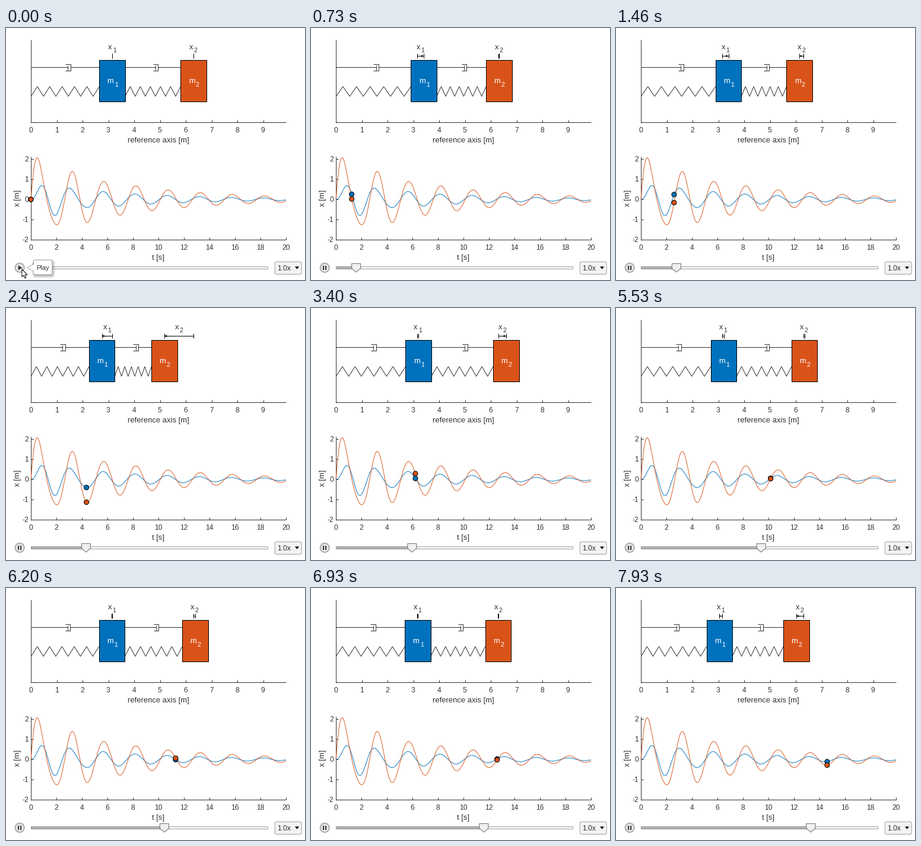
These frames come from a looping animation (504 px wide and 425 px high, 8000 ms). A matplotlib script:

```python
import numpy as np
import matplotlib.pyplot as plt
from matplotlib.animation import FuncAnimation
from matplotlib.patches import Circle, FancyBboxPatch, Polygon, Rectangle

W, H, DPI = 504, 425, 100
LOOP_MS, INTERVAL = 8000, 40
FRAMES = LOOP_MS // INTERVAL
STEPS = 120                      # screen updates per loop

BLUE, ORANGE, INK, GREY = "#0072BD", "#D95319", "#333333", "#8c8c8c"
PT = 72 / DPI                    # points per pixel
NUDGE = 0.2                      # keeps half-pixel lines on their own pixel when snapped

plt.rcParams["font.family"] = "Liberation Sans"
fig = plt.figure(figsize=(W / DPI, H / DPI), dpi=DPI, facecolor="white")
ax = fig.add_axes([0, 0, 1, 1])
ax.set(xlim=(NUDGE, W + NUDGE), ylim=(H + NUDGE, NUDGE))
ax.axis("off")


# ---------- drawing helpers (pixel coordinates, y down) ----------
def line(x=(), y=(), color=INK, width=1.0, z=2, alpha=1):
    return ax.plot(x, y, color=color, lw=width * PT, zorder=z, alpha=alpha,
                   solid_capstyle="butt", solid_joinstyle="miter")[0]


def label(x, y, text, size=12, color=INK, ha="center", va="center_baseline", **kw):
    return ax.text(x, y, text, fontsize=size * PT, color=color, ha=ha, va=va, **kw)


def add(patch):
    return ax.add_patch(patch)


def shape(points, face, edge, z, width=1.0):
    return add(Polygon(points, fc=face, ec=edge, lw=width * PT, zorder=z))


def rounded(x, y, w, h, r, face, edge, z, alpha=1):
    return add(FancyBboxPatch((x, y), w, h, boxstyle=f"round,pad=0,rounding_size={r}",
                              fc=face, ec=edge, lw=PT, zorder=z, alpha=alpha))


# ---------- two masses in a row, the second one kicked ----------
K1, K2, C1, C2, RATIO, KICK = 10.05, 10.05, 0.1, 1.0, 0.25, 7.85
SYSTEM = np.array([
    [0, 0, 1, 0],
    [0, 0, 0, 1],
    [-K1 - RATIO * K2, RATIO * K2, -C1 - RATIO * C2, RATIO * C2],
    [K2, -K2, C2, -C2],
])
POLES, MODES = np.linalg.eig(SYSTEM)
WEIGHTS = np.linalg.solve(MODES, np.array([0, 0, 0, KICK], dtype=complex))


def response(t):
    """Displacements (x1, x2) at time t."""
    parts = WEIGHTS[:, None] * np.exp(np.outer(POLES, np.atleast_1d(t)))
    return (MODES @ parts).real[:2]


# ---------- upper axes ----------
X0, METRE = 42.5, 43.5
line([X0, X0], [20, 160])
line([X0, 472], [159.5, 159.5])
for k in range(10):
    x = X0 + k * METRE
    line([x, x], [155.5, 159.5])
    label(x - 0.5, 172, str(k))
label(257, 188.7, "reference axis [m]", 13)

# ---------- lower axes ----------
SEC, UNIT, ZERO = 21.5, 34.0, 289.3
line([X0, X0], [217.5, 358])
line([X0, 472], [357.5, 357.5])
for k in range(0, 21, 2):
    x = X0 + k * SEC
    line([x, x], [353.5, 357.5])
    label(x - 0.3, 369.6, str(k))
for k in range(-2, 3):
    y = ZERO - k * UNIT
    line([X0, X0 + 4], [y, y])
    label(38, y - 0.3, str(k), ha="right")
label(257, 386.5, "t [s]", 13)
label(20.5, 286.7, "x [m]", 13, va="center", rotation=90)

grid = np.linspace(0, 20, 900)
for x, color in zip(response(grid), (BLUE, ORANGE)):
    line(X0 - 0.3 + grid * SEC, ZERO - x * UNIT, color, 1.1, 3, 0.85)


# ---------- moving parts ----------
class Link:
    """Damper and spring between two x positions."""

    def __init__(self):
        self.rod, self.piston, self.cup, self.tail, self.spring = (
            line() for _ in range(5))

    def place(self, a, b):
        mid = (a + b) / 2
        self.rod.set_data([a, mid + 4.3], [66.5, 66.5])
        self.piston.set_data([mid + 4.3] * 2, [63, 71])
        self.cup.set_data([mid, mid + 8.7, mid + 8.7, mid], [61.5, 61.5, 72.5, 72.5])
        self.tail.set_data([mid + 8.7, b], [66.5, 66.5])
        self.spring.set_data(np.linspace(a, b, 12), [115.5, 99] * 6)


class Mass:
    """Block with its name, displacement arrow and dot on the graph."""

    def __init__(self, index, rest, color):
        self.rest = rest
        self.box = add(Rectangle((rest, 54.5), METRE, 70, fc=color, ec="black",
                                 lw=PT, zorder=4))
        self.name = label(0, 93, "m", 13, "white", "left", "baseline", zorder=5)
        self.name_sub = label(0, 99, str(index), 10.5, "white", "left", "baseline", zorder=5)
        self.tag = label(0, 35.7, "x", 13, ha="left", va="baseline")
        self.tag_sub = label(0, 41.4, str(index), 10.5, ha="left", va="baseline")
        ref = rest + METRE / 2
        line([ref, ref], [43.5, 51], "black")
        self.end, self.shaft = line(color="black"), line(color="black")
        self.head = shape([(0, 0)] * 3, "black", "none", 3)
        self.dot = add(Circle((0, 0), 4, fc=color, ec="black", lw=PT, zorder=6))

    def place(self, t, disp):
        left = self.rest + disp * METRE
        ref, tip = self.rest + METRE / 2, left + METRE / 2
        self.box.set_x(left)
        self.name.set_x(left + 13.3)
        self.name_sub.set_x(left + 25.5)
        mid = (ref + tip) / 2
        self.tag.set_x(mid - 6.8)
        self.tag_sub.set_x(mid + 0.7)
        self.end.set_data([tip, tip], [43.5, 51])
        self.shaft.set_data([ref, tip], [47.5, 47.5])
        size = min(4.0, abs(tip - ref) / 2)
        base = tip - np.sign(disp) * size
        self.head.set_xy([(tip, 47.5), (base, 47.5 - size / 2), (base, 47.5 + size / 2)])
        self.dot.center = (X0 - 0.3 + t * SEC, ZERO - disp * UNIT)
        return left


links = [Link(), Link()]
masses = [Mass(1, 157.5, BLUE), Mass(2, 294.6, ORANGE)]

# ---------- player bar ----------
add(Rectangle((42.5, 402.5), 399, 4, fc="#f4f4f4", ec="#a6a6a6", lw=PT, zorder=2))
played = add(Rectangle((42.5, 402.5), 0, 4, fc="#b4b4b4", ec="#909090", lw=PT, zorder=3))
THUMB = np.array([(-7.5, 397.5), (7.5, 397.5), (7.5, 405.5), (0, 412), (-7.5, 405.5)])
thumb = shape(THUMB, "#f0f0f0", "#6e6e6e", 4)

add(Circle((23.3, 404.5), 7.7, fc="#e4e4e4", ec=GREY, lw=1.2 * PT, zorder=2))
play = shape([(20.8, 400.6), (20.8, 408.4), (27.6, 404.5)], "#333333", "none", 3)
pause = [add(Rectangle((x, 401), 2, 7, fc="#333333", ec="none", zorder=3))
         for x in (20.3, 24.3)]

rounded(453.5, 394.5, 45, 21, 3, "#f3f3f3", "#a0a0a0", 2)
label(457, 404.5, "1.0x", 12, ha="left")
shape([(487, 402.5), (494.5, 402.5), (490.8, 407)], "#111111", "none", 3)

tooltip = [rounded(48 - g, 394 - g, 31 + 2 * g, 24 + 2 * g, 3 + g, "black", "none", 7, 0.06)
           for g in range(5)]
tooltip += [
    rounded(46.5, 391.5, 31.5, 24.5, 3, "white", "#a8a8a8", 8),
    shape([(47.2, 398.5), (36, 404.5), (47.2, 410.5)], "white", "none", 9),
    line([46.5, 36, 46.5], [398.5, 404.5, 410.5], "#a8a8a8", 1, 10),
    label(62.3, 404, "Play", 11, zorder=10),
]

ARROW = np.array([(0, 0), (0, 13), (3, 10.3), (5, 15), (7.2, 14), (5.2, 9.5), (9.3, 9.3)])
cursor = shape(ARROW + (27, 407), "white", "black", 12)

# graph time reached at some of the screen updates
KNOT_STEPS = [1, 22, 51, 64, 83, 104, 119]
KNOT_TIMES = [0, 2.6, 6.23, 7.9, 10.17, 12.64, 14.6]


def update(n):
    step = int((n * INTERVAL + INTERVAL - 4) * STEPS / LOOP_MS)
    t = np.interp(step, KNOT_STEPS, KNOT_TIMES)
    left1, left2 = (m.place(t, d) for m, d in zip(masses, response(t)[:, 0]))
    links[0].place(X0, left1)
    links[1].place(left1 + METRE, left2)
    thumb_x = 53 + 18.87 * t
    thumb.set_xy(THUMB + (thumb_x, 0))
    played.set_width(thumb_x - 42.5)

    running = step > 0
    play.set_visible(not running)
    for part in pause:
        part.set_visible(running)
    for part in tooltip:
        part.set_visible(not running)
    cursor.set_xy(ARROW + (27, 407 + 3 * max(step - 1, 0)))
    return []


anim = FuncAnimation(fig, update, frames=FRAMES, interval=INTERVAL,
                     init_func=lambda: update(0), repeat=True, repeat_delay=0)
plt.show()
```
